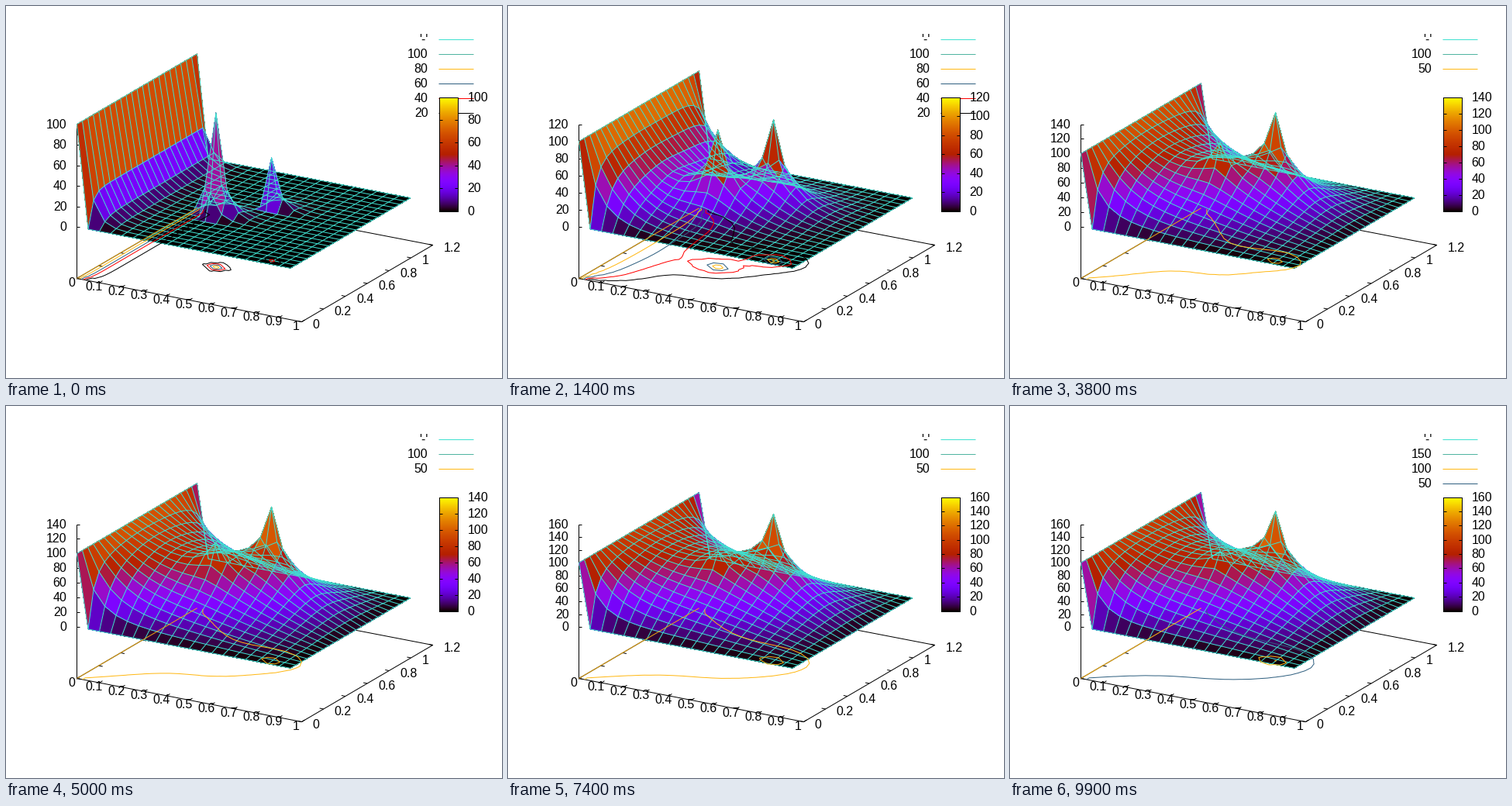
These frames come from a looping animation (640x480 px, 10 s). A matplotlib script:

```python
import numpy as np
import matplotlib.pyplot as plt
from matplotlib.animation import FuncAnimation
from matplotlib.collections import LineCollection, PolyCollection
from matplotlib.patches import Rectangle
from matplotlib.tri import Triangulation

FRAMES = 100
NX, NY, H = 20, 23, 0.05
HOT, SOURCE, GAIN = (8, 9), (11, 13), 50
Z0, Z_SPAN = 284.67, 132.67  # pixel row of z = 0 and height of the z axis
PX = 0.72  # one pixel in points at 100 dpi
MESH = "#40e0d0"
LEVEL_COLORS = ["#eaa814", "#ffb814", "#306080", "#ff0000", "#000000"]
KEY_COLORS = ["#50b4a0"] + LEVEL_COLORS[1:]

plt.rcParams["font.family"] = "Liberation Sans"
plt.rcParams["font.size"] = 16 * PX


def relax():
    """Gauss-Seidel sweeps of a heated plate, one state per frame."""
    u = np.zeros((NX, NY))
    u[0] = 100
    u[HOT] = 100
    states = []
    for _ in range(FRAMES):
        for i in range(1, NX - 1):
            for j in range(1, NY - 1):
                if (i, j) == HOT:
                    continue
                u[i, j] = (u[i - 1, j] + u[i + 1, j] + u[i, j - 1] + u[i, j + 1]) / 4
                if (i, j) == SOURCE:
                    u[i, j] += GAIN
        states.append(u.copy())
    return states


def project(x, y):
    """Base plane position in pixels."""
    return 91 + 290 * x + 141 * y, 351 + 56 * x - 82.5 * y


def palette(v):
    v = np.clip(v, 0, 1)
    return np.stack([np.sqrt(v), v**3, np.clip(np.sin(2 * np.pi * v), 0, 1)], axis=-1)


def contour_levels(peak):
    step = 20 if peak < 120 else 50
    return [step * k for k in range(1, int(peak // step) + 1)]


def mesh(u, top):
    """Filled cells, scan by scan, and the wires that run over all of them."""
    pts = np.stack([gx, gy - 351 + Z0 - u * Z_SPAN / top], axis=-1)
    cells = np.stack([pts[:-1, :-1], pts[1:, :-1], pts[1:, 1:], pts[:-1, 1:]], axis=2)
    mean = (u[:-1, :-1] + u[1:, :-1] + u[1:, 1:] + u[:-1, 1:]) / 4
    wires = list(pts) + list(pts.swapaxes(0, 1))
    return cells.reshape(-1, 4, 2), palette(mean.ravel() / top), wires


states = relax()
gx, gy = project(*np.meshgrid(np.arange(NX) * H, np.arange(NY) * H, indexing="ij"))
index = np.arange(NX * NY).reshape(NX, NY)
sw, se, ne, nw = (s.ravel() for s in
                  (index[:-1, :-1], index[1:, :-1], index[1:, 1:], index[:-1, 1:]))
triangles = np.concatenate([np.stack([sw, se, nw], 1), np.stack([ne, nw, se], 1)])
tri = Triangulation(gx.ravel(), gy.ravel(), triangles)

fig = plt.figure(figsize=(6.4, 4.8), dpi=100, facecolor="white")
ax = fig.add_axes([0, 0, 1, 1])
ramp = palette(np.linspace(1, 0, 147))[:, None, :]
ax.imshow(ramp, extent=(559, 583, 264, 117), aspect="auto", zorder=5,
          interpolation="nearest")
# Whole numbers are pixel centres, kept just below the snapping threshold.
ax.set_xlim(-0.49, 639.51)
ax.set_ylim(479.49, -0.51)
ax.axis("off")


def lines(segments, color="black", zorder=1):
    return ax.add_collection(LineCollection(segments, colors=color, linewidths=PX,
                                            zorder=zorder))


def label(x, y, text, ha):
    return ax.text(x - 1, y + 5, text, ha=ha, va="baseline", zorder=7)


def tick(p, dx, dy):
    return [p, (p[0] + dx, p[1] + dy)]


def draw_frame_box():
    corners = [project(*c) for c in ((0, 0), (1, 0), (1, 1.2), (0, 1.2), (0, 0))]
    segments = [corners, [(91, 152), (91, 351)]]
    for k in range(11):
        p = project(k / 10, 0)
        segments.append(tick(p, 4, -2.4))
        label(p[0] - 6, p[1] + 5, f"{k / 10:g}", "center")
    for k in range(7):
        p = project(1, k / 5)
        segments += [tick(p, -5, -1), tick(project(0, k / 5), 5, 1)]
        label(p[0] + 15, p[1] + 3, f"{k / 5:g}", "left")
    lines(segments)
    ax.add_patch(Rectangle((559, 117), 24, 147, fill=False, ec="black", lw=PX,
                           zorder=6))
    label(545, 42, "'-'", "right")
    lines([[(558, 42), (603, 42)]], MESH, 4)


draw_frame_box()
surface = ax.add_collection(PolyCollection([], linewidths=0, antialiaseds=False,
                                           zorder=2))
net = lines([], MESH, 2.5)
live = []


def draw_scales(top):
    z_ticks, bar_ticks = [], []
    for v in range(0, top + 1, 20):
        y = Z0 - Z_SPAN * v / top
        z_ticks.append(tick((91, y), 4, 0))
        live.append(label(79, y, str(v), "right"))
        y = 264 - 147 * v / top
        bar_ticks += [tick((559, y), 4, 0), tick((583, y), -4, 0)]
        live.append(label(596, y, str(v), "left"))
    live.extend([lines(z_ticks), lines(bar_ticks, zorder=6)])


def draw_key(levels):
    for k, v in enumerate(reversed(levels)):
        y = 61 + 19 * k
        live.append(label(545, y, str(v), "right"))
        live.append(lines([[(558, y), (603, y)]], KEY_COLORS[k], 4))


def update(n):
    while live:
        live.pop().remove()
    u = states[n]
    peak = u.max()
    top = int(np.ceil(peak / 20 - 1e-9)) * 20
    cells, colors, wires = mesh(u, top)
    surface.set_verts(cells)
    surface.set_facecolor(colors)
    net.set_segments(wires)
    levels = contour_levels(peak)
    live.append(ax.tricontour(tri, u.ravel(), levels=levels, linewidths=PX,
                              colors=LEVEL_COLORS[:len(levels)][::-1],
                              antialiased=True, zorder=3))
    draw_scales(top)
    draw_key(levels)
    return []


anim = FuncAnimation(fig, update, frames=FRAMES, interval=100, init_func=lambda: [],
                     repeat=True, blit=False)
plt.show()
```
